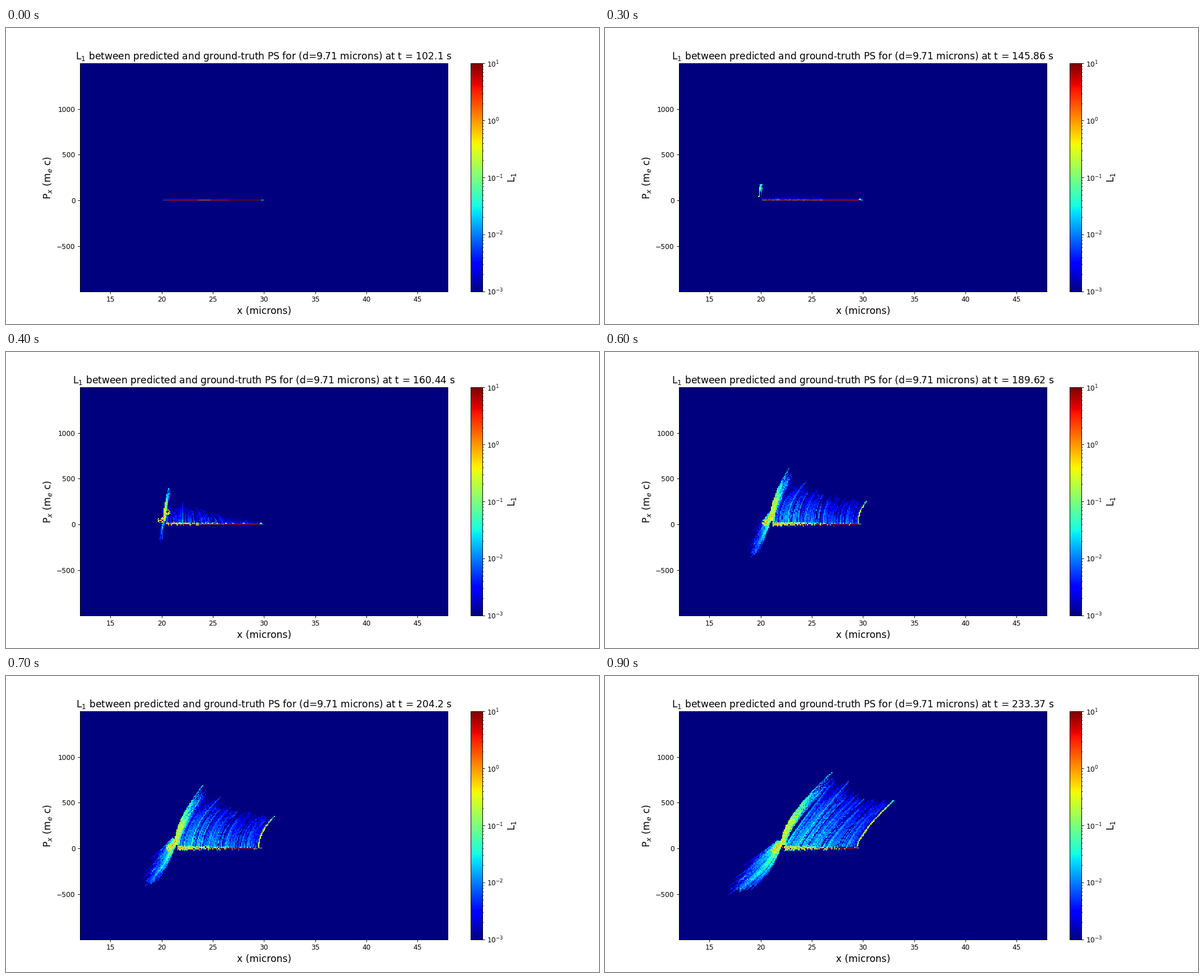
Write a matplotlib script that moves like this. It is 1058 px wide and 529 px high and loops after 1000 ms.

```python
import numpy as np
import matplotlib.pyplot as plt
from matplotlib.animation import FuncAnimation
from matplotlib.colors import LogNorm

W, H, FRAMES = 1058, 529, 10
NX, NY = 400, 251
LEFT, TOP = 0.125 * W, 0.12 * H
CELL_X, CELL_Y = 0.62 * W / NX, 0.77 * H / NY
BEAM_Y = 307.7
STEP = 14.5859


def ease(k, begin=3):
    """Progress from step `begin` to the last step."""
    return max(0, (k - begin) / (FRAMES - 1 - begin))


def move(t, a, b, px=1, py=1):
    """Point on the way from a to b, with an easing power per axis."""
    return a[0] + (b[0] - a[0]) * t ** px, a[1] + (b[1] - a[1]) * t ** py


def put(img, x, y, v):
    """Write log10 values into the cells under stage points."""
    x, y, v = np.broadcast_arrays(x, y, v)
    c = ((x - LEFT) / CELL_X).astype(int)
    r = ((y - TOP) / CELL_Y).astype(int)
    ok = (c >= 0) & (c < NX) & (r >= 0) & (r < NY)
    img[r[ok], c[ok]] = v[ok]


def along(w, pts):
    """Points at fraction w of a polyline with evenly spaced knots."""
    knots = np.linspace(0, 1, len(pts))
    xs, ys = np.transpose(pts)
    return np.interp(w, knots, xs), np.interp(w, knots, ys)


def bezier(u, a, b, c):
    return (1 - u) ** 2 * a + 2 * u * (1 - u) * b + u ** 2 * c


def strands(rng, n, shortest, samples=150):
    """Column of shuffled strand positions and their running parameter."""
    w = rng.permutation(np.linspace(0, 1, n))[:, None]
    return w, np.linspace(0, 1, samples) * rng.uniform(shortest, 1, (n, 1))


def grain(rng, shape, strand, cell):
    return rng.normal(0, strand, (shape[0], 1)) + rng.normal(0, cell, shape)


def draw_beam(img, k, rng, start, base):
    x = np.arange(start, base + 5, CELL_X)
    rough = 0.12 * min(k, 3) * (x < 390)
    v = 0.55 - rough * rng.exponential(1, len(x))
    if k < 3:
        v += 0.3 * (x > 399) - 0.45 * (np.abs(x - 354) < 11)
        v[x < 288] = -2.1
    v[x > base + 1] = -1.4
    put(img, x, BEAM_Y, v)


def draw_fan(img, k, t, elbow, arm, base, rng):
    """Sheet of bent streaks between the arm and the bright front."""
    shoulder = move(t, (288, 300), (420, 172), 1.3, 0.7)
    middle = move(t, (325, 300), (465, 218), 1.1, 0.8)
    front = move(ease(k, 4.5), (456, 306), (515, 223), 1.6, 0.7)
    bend = 2.6 - 1.2 * t ** 2

    w, s = strands(rng, 190, 0.5, 170)
    s = s ** (0.55 + 0.35 * (1 - w))
    tx, ty = along(w, [shoulder, middle, front])
    bx = elbow[0] + (base - elbow[0]) * w
    x = bx + (tx - bx) * s ** (bend - 0.3 * t * (1 - w))
    y = BEAM_Y + (ty - BEAM_Y) * s
    gaps = 0.8 * (rng.random(w.shape) < 0.25)
    v = -1.65 - 0.6 * s - 0.4 * w - 0.45 * (1 - w) * s ** 2 - gaps
    put(img, x, y, v - 0.7 * (1 - t) ** 2 + grain(rng, x.shape, 0.2, 0.09))

    u = np.linspace(0, 1, 160)
    put(img, base + (front[0] - base) * u ** bend,
        BEAM_Y + (front[1] - BEAM_Y) * u,
        -0.5 - 0.9 * np.clip((u - 0.7) / 0.3, 0, 1))


def draw_tail(img, t, hot, rng):
    """Plume thrown back below the beam."""
    width = min(1, 0.1 + 1.6 * t)
    ends = [move(t, (278, 306), (247, 341), 1.3, 1.2),
            move(t, (279, 309), (212, 397), 1.6, 0.5),
            move(t, (279, 308), (266, 378), 1, 0.6)]
    w, s = strands(rng, 90, 0.6)
    ex, ey = along(w, ends)
    ex = ex + rng.normal(0, 4 * width, w.shape)
    mx, my = (hot[0] + ex) / 2, (hot[1] + ey) / 2
    x = bezier(s, hot[0] + 7 * width * (w - 0.5),
               mx + (hot[0] - 12 - mx) * w * width, ex)
    y = bezier(s, hot[1] + 7 * width * (w - 0.5), my + 8 * w * width, ey)
    v = -0.75 - 1.5 * s ** 0.9 - 0.8 * np.abs(w - 0.75) - 0.5 * (1 - t) ** 2
    put(img, x, y, v + grain(rng, x.shape, 0.2, 0.12))


def draw_arm(img, t, elbow, arm, rng):
    """Bright plume rising from the elbow."""
    width = min(1, 0.1 + 1.6 * t)
    bend = move(t, (278, 275), (316, 256))
    w, s = strands(rng, 60, 0.45)
    x = bezier(s, elbow[0] - 4 + 6 * w * width, bend[0] - 2 + 9 * w * width,
               arm[0] + 9 * w * width)
    x = x + rng.normal(0, 1.2 * width, w.shape)
    y = bezier(s, elbow[1], bend[1] + 10 * w * width, arm[1] + 10 * w * width)
    v = -0.8 - 1.25 * np.clip((s - 0.4) / 0.5, 0, 1) - 0.5 * w
    put(img, x, y, v + grain(rng, x.shape, 0.25, 0.2))


def draw_core(img, t, elbow, hot, base, rng):
    """Hot fuzz along the beam and across the elbow."""
    n = int(500 * min(1, 2 * t))
    dx = rng.exponential(34, n)
    dy = rng.normal(0, 0.8 + 1.2 * t, n)
    v = -0.1 - 0.28 * np.abs(dy) - dx / 160 + rng.normal(0, 0.25, n)
    ok = elbow[0] + dx < base
    put(img, (elbow[0] + dx)[ok], (BEAM_Y - 0.5 + dy)[ok], v[ok])
    n //= 3
    u, off = rng.uniform(0, 1, n), rng.normal(0, 1.8, n)
    put(img, hot[0] - 13 + 19 * u + off, hot[1] + 17 - 20 * u + off,
        -0.3 - 0.15 * np.abs(off) + rng.normal(0, 0.3, n))


def density(k):
    rng = np.random.default_rng(7)
    img = np.full((NY, NX), -3.0)
    t = ease(k)
    base = 455 - 5.5 * t
    elbow = move(t, (279, 302), (320, 302))
    if k >= 3:
        hot = move(t, (280, 285), (312, 298))
        arm = move(t, (281, 281), (408, 171), 1.4, 0.6)
        draw_fan(img, k, t, elbow, arm, base, rng)
        draw_tail(img, t, hot, rng)
        draw_arm(img, t, elbow, arm, rng)
        draw_core(img, t, elbow, hot, base, rng)
    draw_beam(img, k, rng, elbow[0] + 2, base)
    return 10 ** img


fig, ax = plt.subplots(figsize=(12, 6), dpi=88.1667)
image = ax.imshow(density(0), cmap="jet", norm=LogNorm(1e-3, 10),
                  extent=(12.05, 47.94, -998, 1498), aspect="auto",
                  interpolation="nearest")
ax.set_xlabel("x (microns)", fontsize=14)
ax.set_ylabel("P$_x$ (m$_e$ c)", fontsize=14)
title = ax.set_title("", fontsize=14)
fig.colorbar(image, ax=ax).set_label("L$_1$", fontsize=14)


def update(k):
    image.set_data(density(k))
    title.set_text("L$_1$ between predicted and ground-truth PS for "
                   f"(d=9.71 microns) at t = {round(STEP * (7 + k), 2)} s")
    return image, title


anim = FuncAnimation(fig, update, frames=FRAMES, interval=100, repeat=True)
plt.show()
```
